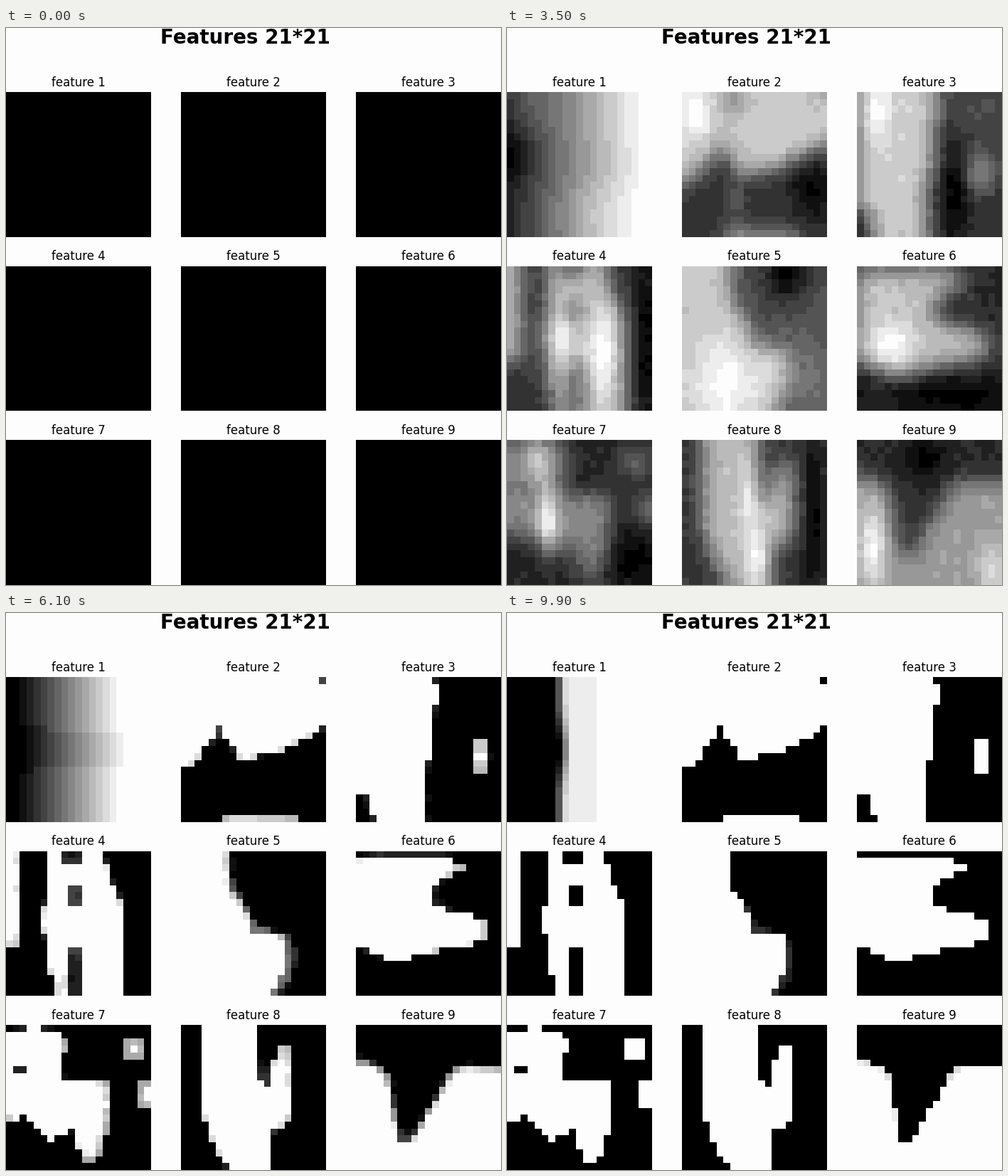
Animation of 696 by 783 pixels, one loop 10000 ms. Source, as a matplotlib script:

```python
import matplotlib.pyplot as plt
import numpy as np
from matplotlib.animation import FuncAnimation
from matplotlib.path import Path

N = 21
W, H, DPI = 696, 783, 100
SIDE, PAPER = 203.8, 253
FRAMES, STEP = 100, 100

rng = np.random.default_rng(21)
X, Y = np.meshgrid(np.arange(N) + .5, np.arange(N) + .5)
CELLS = np.column_stack([X.ravel(), Y.ravel()])

gap = np.subtract.outer(np.arange(N), np.arange(N))
KERNEL = np.exp(-(gap / 2) ** 2)
KERNEL /= KERNEL.sum(axis=1, keepdims=True)


def bell(u, mid, width):
    return np.exp(-((u - mid) / width) ** 2)


def spots(spec):
    """Sum of soft spots (x, y, width, height, amount)."""
    return sum((a * bell(X, x, w) * bell(Y, y, h) for x, y, w, h, a in spec),
               np.zeros((N, N)))


def spread(values, u):
    """Curve through evenly spaced values."""
    return np.interp(u, np.linspace(.5, N - .5, len(values)), values)


def box(x, y, w, h):
    return [(x, y), (x + w, y), (x + w, y + h), (x, y + h)]


def side(*polys):
    """Even-odd fill of the outlines, as +1 / -1 cells."""
    inside = np.zeros(N * N, bool)
    for p in polys:
        inside ^= Path(p + p[:1], closed=True).contains_points(CELLS)
    return np.where(inside.reshape(N, N), 1.0, -1.0)


def smooth(u):
    u = np.clip(u, 0, 1)
    return u * u * (3 - 2 * u)


def stretch(v):
    return (v - v.min()) / (v.max() - v.min())


def grain():
    return rng.normal(0, .015, (N, N))


def banded(*values):
    """Column curve crossed by the bands most early features share."""
    bands = .1 - .35 * bell(Y, .5, 1) - .35 * bell(Y, 7.7, 1.7)
    return spread(values, X) + bands - .018 * np.maximum(Y - 9, 0)


def ramp(t):
    """Left-to-right ramp that narrows to an edge with a pale shelf."""
    keys = [3.5, 4.4, 6.1, 7.6, 9.9]
    width = np.interp(t, keys, [22, 19, 15, 4, 2])
    mid = np.interp(t, keys, [8.5, 8.3, 9.3, 7.8, 8])
    bulge = .7 * bell(Y, 10.5, 4) - .2
    v = .5 + (X - mid - bulge) / width
    fade = np.interp(t, [3.5, 6.5], [1, 0])
    v += fade * spots([(2, 1, 5, 4, .1), (1, 9, 3, 4, -.1),
                       (12, 18, 6, 5, .08)])
    return np.where(X < 13, np.minimum(v, .93), v)


def log_gain(t):
    return np.interp(t, [3.5, 4.4, 6.1, 7.6, 9.9],
                     np.log([1, 2.6, 13, 25, 45]))


class Ramp:
    def __init__(self, early):
        self.early = stretch(np.clip(early + grain(), 0, 1))
        self.mid = np.clip(ramp(3.5), 0, 1)

    def late(self, t):
        return ramp(t)

    def at(self, t):
        if t == 0:
            return np.zeros((N, N))
        if t >= 3.5:
            return self.late(t)
        w = smooth((t - 1.9) / 1.5)
        return stretch(self.early * (1 - w) + self.mid * w)


class Region(Ramp):
    """Soft tones that harden into black and white regions."""

    def __init__(self, early, sign, tones, low=.2, span=.6, cut=.5, rate=1):
        self.early = stretch(np.clip(early + grain(), 0, 1))
        soft = KERNEL @ (sign + 1) / 2 @ KERNEL.T
        self.mid = np.clip(low + span * soft + spots(tones) + grain(), 0, 1)
        self.push = sign * np.maximum(sign * (self.mid - cut), .03)
        self.rate = rate

    def late(self, t):
        return self.mid + (np.exp(self.rate * log_gain(t)) - 1) * self.push


def shade(v):
    """Sixteen grey levels."""
    return np.round(np.clip(v, 0, 1) * 15) * PAPER / 15


lean = 4 * np.clip((Y - 9) / 11, 0, 1)
feature1 = Ramp((X + lean - 1.5) / 20)

feature2 = Region(
    spread([.82, .9, .72, .47, .2, .1], Y)
    + spots([(3, 4, 3, 3, .13), (11, 7, 2, 4, .12)]),
    side([(0, 0), (21, 0), (21, 7), (15, 10.7), (8.5, 12), (5.5, 7),
          (2, 12.8), (0, 13)], box(6, 20, 11, 1), box(20, 0, 1, 1)),
    [(2, 3, 2, 4, .22), (7.5, 1, 2, 3, -.2), (19, 14, 3, 4, -.18),
     (8, 16, 1.4, 5, .13)])

wide = banded(.78, .52, .36, .24, .28, .68)
feature3 = Region(
    wide,
    side([(0, 0), (11, 0), (12, 2), (11, 5), (11, 11), (10, 13), (10, 21),
          (2.6, 21), (2, 17), (0, 17)], box(17, 9, 2, 5)),
    [(3, 3, 2, 4, .2), (14, 15, 2, 7, -.2), (0, 8, 1.5, 14, -.22),
     (18, 3, 4, 5, .1)], cut=.45)

feature4 = Region(
    banded(.85, .42, .32, .33, .4, .45),
    side([(6, 0), (14, 0), (16, 7), (17, 8), (17, 21), (7, 21), (6, 14),
          (5, 10), (6, 6)], box(0, 0, 2, 14), box(8, 0, 3, 2),
         box(9, 5, 2, 3), box(9, 14, 2, 7)),
    [(14, 12.5, 2, 6, .23), (7.7, 11, 1.3, 4, .2), (20, 11, 1.7, 14, -.2)])

feature5 = Region(
    spread([.9, .86, .62, .38, .06, 0], X) + spots([(20, 17, 6, 6, .27)]),
    side([(0, 0), (6, 0), (7, 1), (7, 6), (9, 8), (10.5, 12), (15, 12),
          (15, 17), (13, 21), (0, 21)]),
    [(6, 17, 4, 6, .2), (15, 1, 3, 4, -.3), (18, 16, 6, 7, .15)],
    low=.3, span=.5, cut=.57, rate=.7)

feature6 = Region(
    wide,
    side([(0, 1), (13, 1), (16, 2.5), (11, 5), (11, 8), (19, 10), (19, 13),
          (10, 15), (5, 16), (2, 14.6), (0, 14)]),
    [(5, 11.5, 3, 3, .25), (14, 19, 10, 3, -.17), (0, 6, 1.5, 10, -.18)],
    low=.17, cut=.45)

feature7 = Region(
    banded(.75, .48, .4, .37, .4, .95),
    side([(0, 1), (8, 1), (9, 3), (8, 5), (8, 8), (14, 8), (15, 9), (15, 14),
          (13, 20), (11, 20), (9.6, 15), (6, 17), (3, 13), (0, 14)],
         box(3, 0, 2, 1), box(1, 6, 2, 1), box(17, 2, 3, 3),
         box(19, 8, 2, 4)),
    [(5.8, 11.5, 1.4, 4, .45), (4.5, 3, 2, 3, .25), (18, 17, 4, 4, -.15)],
    low=.15, span=.4, cut=.33)

feature8 = Region(
    banded(.75, .55, .36, .26, .43, .98),
    side([(3, 0), (10.6, 0), (11, 7), (12.5, 9), (14, 3), (16, 3), (16, 14),
          (13, 15), (13, 21), (7, 21), (5, 18), (3, 13)]),
    [(9.7, 8, 1.3, 6, .2), (11, 17, 1.4, 4, .25), (19, 11, 1.4, 12, -.2)],
    span=.55)

feature9 = Region(
    spread([.25, .17, .38, .5, .56, .6], Y)
    + spots([(1, 14, 3, 7, .4), (7.5, 11, 2, 5, -.2), (19, 11, 3, 8, .25),
             (9.5, 2, 4, 2, -.12)]),
    side([(0, 5), (1.5, 5), (4.5, 7.2), (6.4, 17), (8, 17), (13.5, 7),
          (14.5, 6), (21, 6), (21, 21), (0, 21)]),
    [(2.3, 15.5, 2, 6, .35), (19.5, 19, 2, 4, .22), (10, 2.5, 3, 3, -.18)],
    low=.17, span=.45, cut=.4, rate=.75)

features = [feature1, feature2, feature3, feature4, feature5, feature6,
            feature7, feature8, feature9]

plt.rcParams["font.family"] = "DejaVu Sans"
fig = plt.figure(figsize=(W / DPI, H / DPI), dpi=DPI,
                 facecolor=(PAPER / 255,) * 3)
fig.text(336 / W, 1 - 22 / H, "Features 21*21", fontsize=20,
         fontweight="bold", ha="center", va="baseline")

images = []
for k in range(9):
    left, top = 246.1 * (k % 3), 90 + 244.6 * (k // 3)
    ax = fig.add_axes([left / W, 1 - (top + SIDE) / H, SIDE / W, SIDE / H])
    ax.axis("off")
    ax.set_title(f"feature {k + 1}", fontsize=12)
    images.append(ax.imshow(np.zeros((N, N)), cmap="gray", vmin=0, vmax=255,
                            interpolation="nearest", aspect="auto"))


def update(frame):
    for image, feature in zip(images, features):
        image.set_data(shade(feature.at(frame * STEP / 1000)))
    return images


anim = FuncAnimation(fig, update, frames=FRAMES, interval=STEP,
                     repeat=True, repeat_delay=0, blit=False)
plt.show()
```
